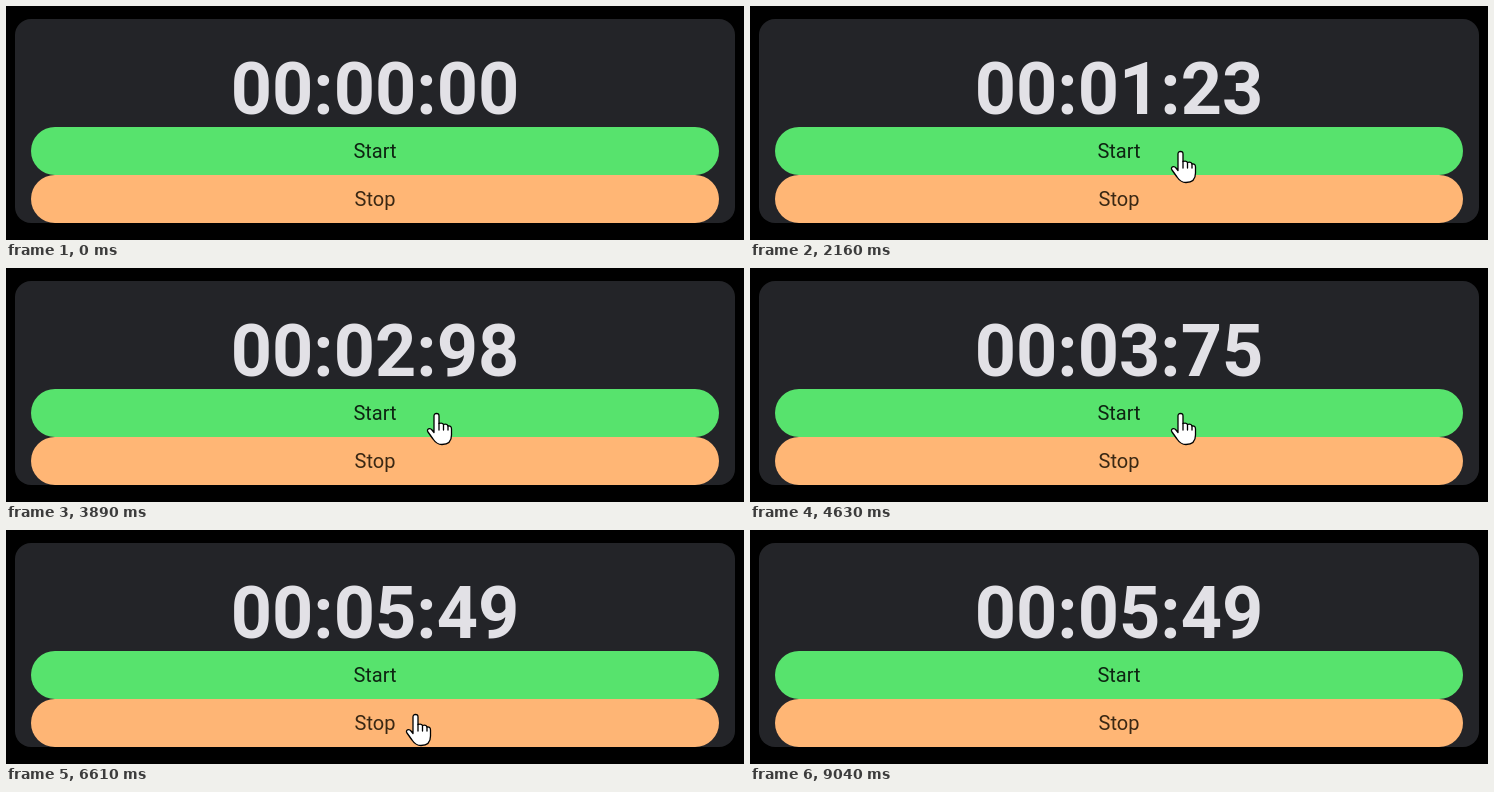
An HTML page that plays this animation: 738x234 px, repeating every 9.54 s.

```html
<!DOCTYPE html>
<html lang="en">
<head>
<meta charset="utf-8">
<title>Stopwatch</title>
<style>
  html, body { margin: 0; width: 100%; height: 100%; overflow: hidden; background: #000; }
  svg { display: block; }
  text { font: 20px Roboto, sans-serif; text-anchor: middle; }
  #clock { font-size: 72px; font-weight: 700; fill: #e2e1e6; }
</style>
</head>
<body>
<svg width="738" height="234" viewBox="0 0 738 234">
  <defs>
    <clipPath id="startShape"><rect x="25" y="121" width="688" height="48" rx="24"/></clipPath>
    <clipPath id="stopShape"><rect x="25" y="169" width="688" height="48" rx="24"/></clipPath>
  </defs>
  <rect x="9" y="13" width="720" height="204" rx="16" fill="#232428"/>
  <text id="clock" x="369" y="108">00:00:00</text>

  <g clip-path="url(#startShape)">
    <rect x="25" y="121" width="688" height="48" fill="#57e36d"/>
    <circle id="startRipple" fill="#0e2412"/>
  </g>
  <text x="369" y="152" fill="#0e2412">Start</text>

  <g clip-path="url(#stopShape)">
    <rect x="25" y="169" width="688" height="48" fill="#ffb675"/>
    <circle id="stopRipple" fill="#3a2814"/>
  </g>
  <text x="369" y="200" fill="#3a2814">Stop</text>

  <g id="cursor" stroke="#000" stroke-width="1.3" stroke-linejoin="round" stroke-linecap="round" fill="#fff">
    <g id="hand">
      <path d="M-3 3Q-3 .5-.5 .5Q2 .5 2 3V10.5Q5.500 9.500 6.500 11.500Q10 10.500 11 13Q14.500 12.500 14.500 16V22C14.500 28 11 31.500 5 31.500C0 31.500-2 29-4 26L-9 19C-11 16-7 14.500-5 17L-3 19.500Z"/>
      <path d="M2 10.500V17M6.500 11.500V17M11 13V17" fill="none"/>
    </g>
    <path id="arrow" d="M0 0V17L4 13L6.500 19L9 18L6.500 12H12Z"/>
  </g>
</svg>
<script>
  const LOOP = 9540, TICK = 63.3;
  const bursts = [0, 110, 640, 1660, 2680, 3680, 4700, 5720, 8720];

  // [time, hundredths of a second]
  const count = [[850, 0], [1209.7, 36], [3123.1, 223], [4629.5, 375], [5522.9, 463], [6420, 549]];

  // [time, x, y] of the pointer tip
  const path = [
    [110, 547, 190], [173, 512, 158], [237, 470, 129], [300, 438, 139], [363, 424, 141],
    [1210, 424, 141], [1526, 431, 145],
    [5080, 431, 145], [5460, 413, 183],
    [5720, 413, 183], [5970, 410, 184],
    [8700, 410, 184], [8783, 438, 190], [8847, 478, 200], [8910, 524, 211], [8973, 608, 224]
  ];

  const el = id => document.getElementById(id);
  const clamp = v => Math.max(0, Math.min(1, v));
  const pad = n => String(n).padStart(2, "0");
  const show = (id, on) => el(id).setAttribute("visibility", on ? "visible" : "hidden");

  function sample(keys, t) {
    const next = keys.findIndex(k => k[0] > t);
    if (next === 0) return keys[0].slice(1);
    if (next < 0) return keys[keys.length - 1].slice(1);
    const a = keys[next - 1], b = keys[next];
    const p = (t - a[0]) / (b[0] - a[0]);
    return a.slice(1).map((v, i) => v + (b[i + 1] - v) * p);
  }

  // The screen refreshes in short bursts of even ticks.
  function quantize(t) {
    const start = bursts.filter(b => b <= t).pop();
    return start + Math.min(15, Math.floor((t - start) / TICK)) * TICK;
  }

  function ripple(id, age, x, y, centerY) {
    const grow = clamp(age / 225), p = grow * grow * (3 - 2 * grow);
    const alpha = age < 0 ? 0 : 0.12 * clamp(age / 75) * clamp((375 - age) / 150);
    const circle = el(id);
    circle.setAttribute("cx", x + (369 - x) * p);
    circle.setAttribute("cy", y + (centerY - y) * p);
    circle.setAttribute("r", 70 + 290 * p);
    circle.setAttribute("opacity", alpha);
  }

  function draw(time) {
    const t = quantize(time % LOOP);

    const n = Math.round(sample(count, t)[0]);
    el("clock").textContent = [n / 6000, n / 100 % 60, n % 100].map(v => pad(Math.floor(v))).join(":");

    ripple("startRipple", t - 760, 424, 141, 145);
    ripple("stopRipple", t - 6235, 410, 184, 193);

    const [x, y] = sample(path, t);
    const visible = t >= 110 && t < 9030;
    el("cursor").setAttribute("transform", `translate(${Math.round(x)} ${Math.round(y)})`);
    show("hand", visible && y < 217);
    show("arrow", visible && y >= 217);
  }

  const origin = performance.now();
  function frame() {
    draw(performance.now() - origin);
    requestAnimationFrame(frame);
  }
  frame();
</script>
</body>
</html>
```
